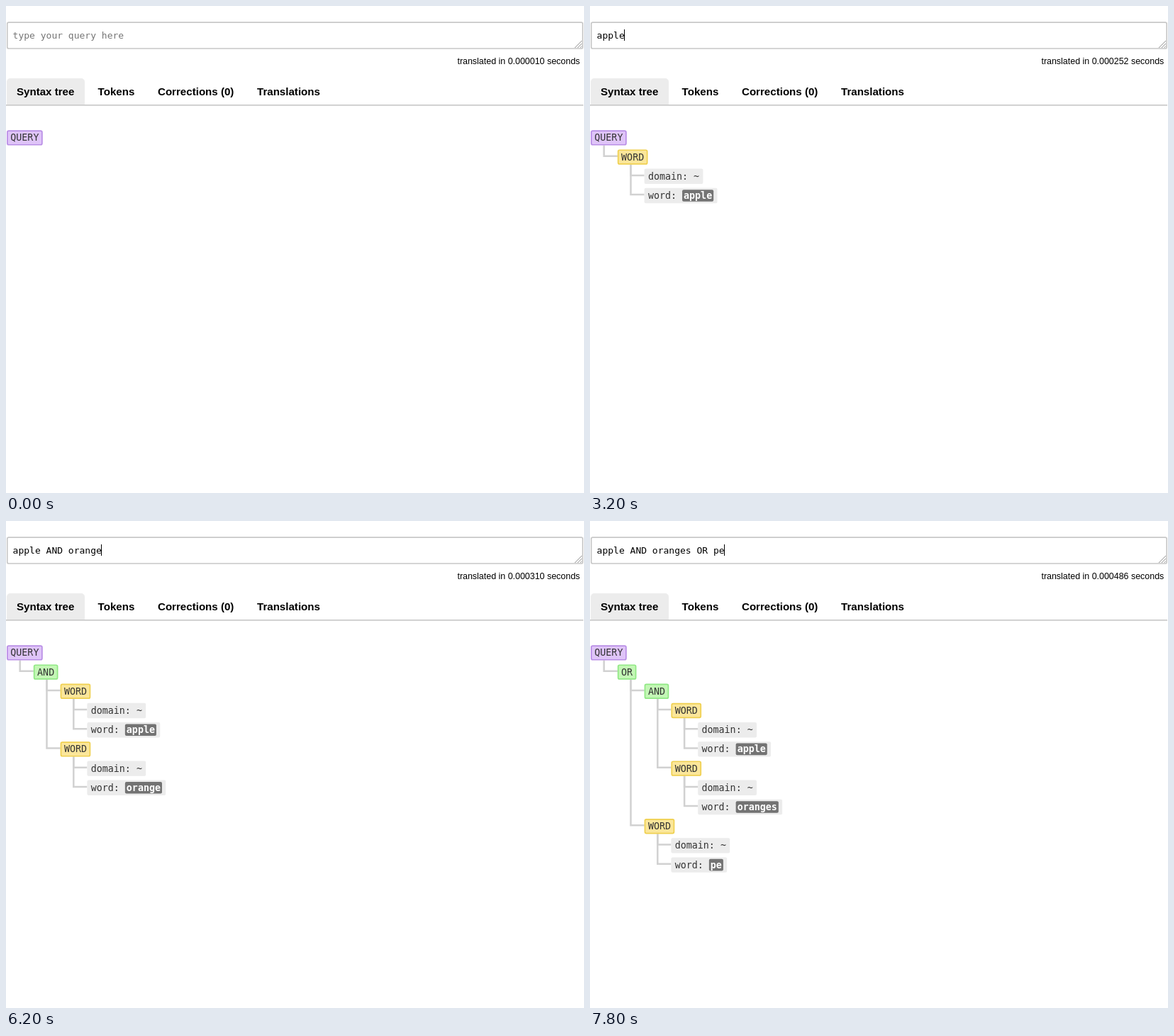
Animation, 815 px wide and 687 px high, one loop 8 s. Source, as an HTML page with a canvas:

```html
<!DOCTYPE html>
<html lang="en">
<head>
<meta charset="utf-8">
<title>Query syntax tree</title>
<style>
  html, body { margin: 0; width: 100%; height: 100%; overflow: hidden; background: #fff; }
  canvas { display: block; width: 815px; height: 687px; }
</style>
</head>
<body>
<canvas id="stage"></canvas>
<script>
const W = 815, H = 687, LOOP = 8000;
const canvas = document.getElementById('stage');
const ctx = canvas.getContext('2d');
const dpr = window.devicePixelRatio || 1;
canvas.width = W * dpr;
canvas.height = H * dpr;

const MONO = '"DejaVu Sans Mono", monospace';
const SANS = '"Liberation Sans", Arial, sans-serif';
const INPUT_FONT = '13px ' + MONO;
const NODE_SIZE = 13.33;
const CHAR = NODE_SIZE * 0.602;
const ROW = 27.2, INDENT = 37.8, BOX_H = 21.4, PAD = 5.3;

const COLORS = {
  QUERY: ['#dfc4f8', '#b98ee6'],
  WORD: ['#fbe69a', '#efd050'],
  AND: ['#c3f7b5', '#90e884'],
  OR: ['#c3f7b5', '#90e884']
};

// start time, query, microseconds, caret shown
const STEPS = [
  [0, '', 10, false],
  [400, '', 10, true],
  [1200, '', 10, false],
  [2200, 'a', 258, true],
  [2400, 'ap', 231, true],
  [2800, 'app', 246, true],
  [3000, 'appl', 239, true],
  [3200, 'apple', 252, true],
  [3400, 'apple ', 248, true],
  [4000, 'apple A', 287, false],
  [4200, 'apple A', 287, true],
  [4400, 'apple AN', 293, true],
  [4600, 'apple AND', 336, true],
  [4800, 'apple AND ', 328, true],
  [5000, 'apple AND o', 387, true],
  [5200, 'apple AND or', 342, true],
  [5400, 'apple AND ora', 335, true],
  [5600, 'apple AND oran', 329, true],
  [5800, 'apple AND orang', 338, true],
  [6200, 'apple AND orange', 310, true],
  [6400, 'apple AND oranges', 324, true],
  [6600, 'apple AND oranges ', 331, true],
  [6800, 'apple AND oranges O', 392, false],
  [7000, 'apple AND oranges O', 392, true],
  [7200, 'apple AND oranges OR', 368, true],
  [7400, 'apple AND oranges OR ', 374, true],
  [7600, 'apple AND oranges OR p', 463, true],
  [7800, 'apple AND oranges OR pe', 486, true]
];

// Builds a left-associative tree; a dangling operator counts as a correction.
function parse(query) {
  const kids = [];
  let op = null;
  for (const token of query.split(' ').filter(Boolean)) {
    if (token === 'AND' || token === 'OR') {
      op = token;
      continue;
    }
    const word = { type: 'WORD', kids: [{ label: 'domain: ~' }, { label: 'word: ', value: token }] };
    kids.push(op ? { type: op, kids: [kids.pop(), word] } : word);
    op = null;
  }
  return { tree: { type: 'QUERY', kids }, corrections: op ? 1 : 0 };
}

function text(str, x, y, font, color, align = 'left') {
  ctx.font = font;
  ctx.fillStyle = color;
  ctx.textAlign = align;
  ctx.fillText(str, x, y);
}

function box(x, y, w, h, radius, fill, border) {
  ctx.beginPath();
  ctx.roundRect(x, y, w, h, radius);
  if (fill) {
    ctx.fillStyle = fill;
    ctx.fill();
  }
  if (border) {
    ctx.strokeStyle = border;
    ctx.lineWidth = 1.7;
    ctx.stroke();
  }
}

function line(points, color, width) {
  ctx.beginPath();
  points.forEach(([x, y]) => ctx.lineTo(x, y));
  ctx.strokeStyle = color;
  ctx.lineWidth = width;
  ctx.stroke();
}

function drawNode(node, x, y) {
  const label = node.type || node.label;
  const chars = label.length * CHAR;
  const base = Math.round(y + 15.2);
  if (node.type) {
    const [fill, border] = COLORS[node.type];
    box(x + 0.85, y + 0.85, chars + 2 * PAD - 1.7, BOX_H - 1.7, 2, fill, border);
  } else {
    const pill = node.value ? node.value.length * CHAR + 4 : 0;
    box(x, y, chars + pill + 2 * PAD, BOX_H, 2, '#ececec');
    if (pill) {
      const px = x + PAD + chars;
      box(px, y + 2.4, pill, 16.6, 2, '#737373');
      text(node.value, px + 2, base, `bold ${NODE_SIZE}px ${MONO}`, '#fff');
    }
  }
  text(label, x + PAD, base, `${NODE_SIZE}px ${MONO}`, '#333');
}

// Draws a subtree and returns the first free row below it.
function drawTree(node, depth, row) {
  const x = 1 + depth * INDENT;
  const y = 175.2 + row * ROW;
  let next = row + 1;
  for (const kid of node.kids || []) {
    const joint = 175.2 + next * ROW + 9.3;
    line([[x + 18.7, y + BOX_H], [x + 18.7, joint], [x + INDENT, joint]], '#d1d1d1', 2.5);
    next = drawTree(kid, depth + 1, next);
  }
  drawNode(node, x, y);
  return next;
}

function drawInput(query, caret) {
  box(1.8, 23.2, 811.4, 36.8, 2, '#fff', '#c8c8c8');
  for (const d of [10, 6, 2.5]) line([[812 - d, 59], [812, 59 - d]], '#8a8a8a', 0.9);
  text(query || 'type your query here', 9.6, 46, INPUT_FONT, query ? '#000' : '#757575');
  if (caret) {
    ctx.fillStyle = '#000';
    ctx.fillRect(Math.round(9.3 + query.length * 7.826 - 0.3), 33, 1, 16);
  }
}

function drawTabs(corrections) {
  box(1, 102, 110, 37.5, [5, 5, 0, 0], '#ececec');
  line([[0, 139.8], [814, 139.8]], '#cbcbcb', 1.8);
  const tabs = [['Syntax tree', 15], ['Tokens', 129.6], [`Corrections (${corrections})`, 214], ['Translations', 354]];
  for (const [label, x] of tabs) text(label, x, 126, `bold 15.1px ${SANS}`, '#000');
}

function draw(now) {
  const t = now % LOOP;
  const [, query, micros, caret] = STEPS.filter(step => step[0] <= t).pop();
  const { tree, corrections } = parse(query);
  ctx.setTransform(dpr, 0, 0, dpr, 0, 0);
  ctx.fillStyle = '#fff';
  ctx.fillRect(0, 0, W, H);
  drawInput(query, caret);
  text(`translated in ${(micros / 1e6).toFixed(6)} seconds`, 809.3, 82, `12.45px ${SANS}`, '#000', 'right');
  drawTabs(corrections);
  drawTree(tree, 0, 0);
}

const start = performance.now();
function frame() {
  draw(performance.now() - start);
  requestAnimationFrame(frame);
}
frame();
</script>
</body>
</html>
```
